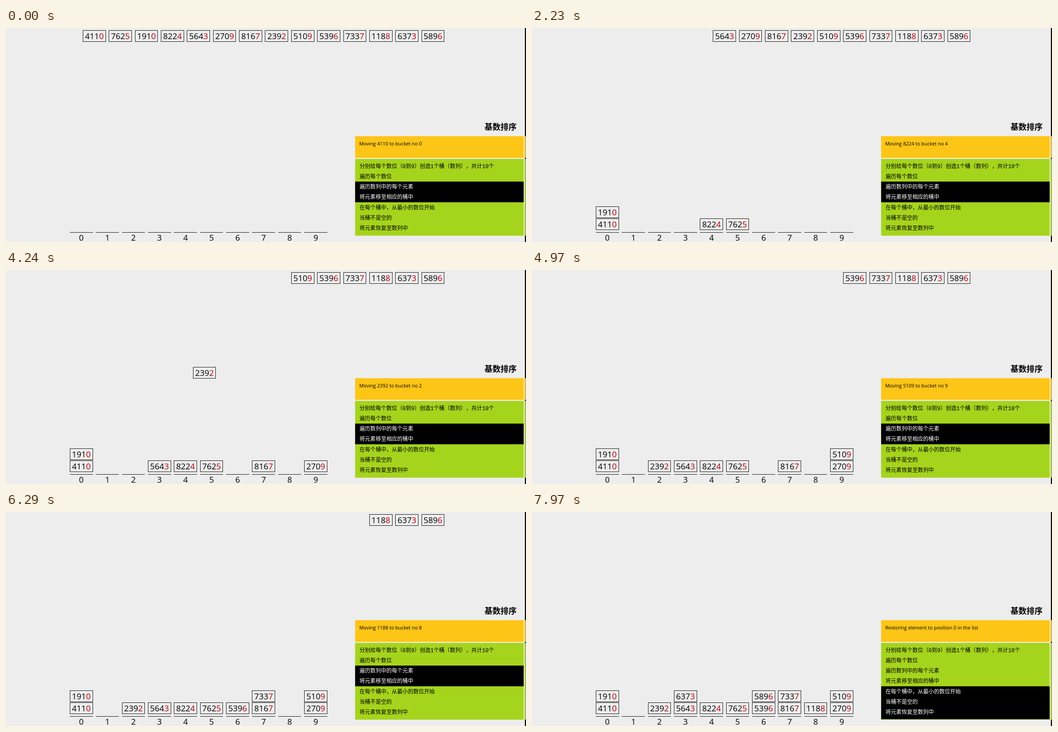
Animation of 1165 by 481 pixels, one loop 7.99 s. Source, as an HTML page:

```html
<!DOCTYPE html>
<html lang="zh-CN">
<head>
<meta charset="utf-8">
<title>基数排序</title>
<style>
  html, body { margin: 0; width: 100%; height: 100%; overflow: hidden; background: #ededed; }
  svg { display: block; }
  .num { font: 18.4px "Open Sans", "Noto Sans", sans-serif; text-anchor: middle; }
  .num tspan { fill: #b4000c; }
  .box { fill: none; stroke: #111; stroke-width: 1; }
  .title { font: bold 18px "Noto Sans CJK SC", "Noto Sans CJK", sans-serif; }
  .msg { font: 10.9px "Open Sans", "Noto Sans", sans-serif; }
  .code {
    font: 300 12.05px "Liberation Mono", "Noto Sans CJK SC", "Noto Sans CJK", monospace;
    text-spacing-trim: space-all;
  }
</style>
</head>
<body>
<svg id="stage" width="1165" height="481" viewBox="0 0 1165 481"></svg>
<script>
const LOOP = 7990, RESTORE = 7970;
const STEP = 58.35, TOP_X = 172.5, BUCKET_X = 143.32, BOX_W = 50.7;
const stage = document.getElementById('stage');

// value, move start, move end
const moves = [
  [4110, 20, 550], [7625, 790, 1170], [1910, 1410, 1710], [8224, 1920, 2230],
  [5643, 2460, 2750], [2709, 2990, 3270], [8167, 3530, 3820], [2392, 4050, 4430],
  [5109, 4660, 4970], [5396, 5200, 5520], [7337, 5740, 6050], [1188, 6290, 6570],
  [6373, 6830, 7220], [5896, 7430, 7730]
];

const lines = [
  '分别给每个数位（0到9）创造1个桶（数列），共计10个',
  '遍历每个数位',
  '遍历数列中的每个元素',
  '将元素移至相应的桶中',
  '在每个桶中，从最小的数位开始',
  '当桶不是空的',
  '将元素恢复至数列中'
];

function add(tag, attrs, text, parent = stage) {
  const el = document.createElementNS('http://www.w3.org/2000/svg', tag);
  set(el, attrs);
  if (text !== undefined) el.textContent = text;
  parent.appendChild(el);
  return el;
}

function set(el, attrs) {
  for (const k in attrs) el.setAttribute(k, attrs[k]);
}

const rect = (x, y, width, height, fill) => add('rect', { x, y, width, height, fill });

// both edges of a box snap to whole pixels
function snap(x) {
  const left = Math.floor(x);
  return { left, width: Math.floor(x + BOX_W) - left };
}

// right edge strip
rect(1162.6, 0, 2.4, 481, '#000');
rect(1162.6, 243.2, 2.4, 48.6, '#fdc516');
rect(1162.6, 294.2, 2.4, 172.6, '#a5d41d');

// panels
add('text', { x: 1072, y: 229, class: 'title' }, '基数排序');
rect(782.2, 243.2, 377.6, 48.6, '#fdc516');
const msg = add('text', { x: 791.5, y: 264, class: 'msg' });
rect(782.2, 294.2, 377.6, 172.6, '#a5d41d');
const mark = rect(782.2, 345.2, 377.6, 46.5, '#000');
const code = lines.map((s, i) =>
  add('text', { x: 792, y: 314.7 + 23.2 * i, class: 'code' }, s));

// buckets
for (let d = 0; d < 10; d++) {
  const x = BUCKET_X + STEP * d;
  const { left, width } = snap(x);
  rect(left, 459, width + 1, 1, '#111');
  add('text', { x: x + 25.5, y: 478, class: 'num' }, d);
}

// numbers, stacked by last digit
const height = Array(10).fill(0);
const items = moves.map(([value, start, end], i) => {
  const digit = value % 10;
  const box = add('rect', { height: 25, class: 'box' });
  const label = add('text', { class: 'num' }, Math.floor(value / 10));
  add('tspan', {}, digit, label);
  return {
    box, label, value, digit, start, end,
    from: [TOP_X + STEP * i, 5],
    to: [BUCKET_X + STEP * digit, 428 - 27 * height[digit]++]
  };
});

const cursor = add('path', {
  d: 'M0 0V11.2L2.5 8.9L4.2 12.8L6 12L4.3 8.2H7.6Z',
  fill: '#fff', stroke: '#000', 'stroke-width': 0.5
});

const progress = (t, a, b) => Math.min(1, Math.max(0, (t - a) / (b - a)));
const swing = p => 0.5 - 0.5 * Math.cos(Math.PI * p);

function place(item, x, y) {
  const { left, width } = snap(x);
  const top = Math.floor(y);
  set(item.box, { x: left + 0.5, y: top + 0.5, width });
  set(item.label, { x: x + 25.5, y: top + 20 });
}

function draw(t) {
  let current = items[0];
  for (const it of items) {
    const p = swing(progress(t, it.start, it.end));
    const [x, y] = it.from.map((v, k) => v + (it.to[k] - v) * p);
    place(it, x, y);
    if (t >= it.start) current = it;
  }

  const restoring = t >= RESTORE;
  msg.textContent = restoring
    ? 'Restoring element to position 0 in the list'
    : `Moving ${current.value} to bucket no ${current.digit}`;
  set(mark, restoring ? { y: 391.7, height: 74.1 } : { y: 345.2, height: 46.5 });
  code.forEach((el, i) => {
    const lit = restoring ? i >= 4 : i === 2 || i === 3;
    set(el, { fill: lit ? '#fff' : '#000' });
  });

  const c = swing(progress(t, 450, 650));
  set(cursor, {
    transform: `translate(${1165 - 20 * c} ${380 - 12 * c})`,
    visibility: t >= 450 && t < 2080 ? 'visible' : 'hidden'
  });
}

const begin = performance.now();
function frame() {
  draw((performance.now() - begin) % LOOP);
  requestAnimationFrame(frame);
}
frame();
</script>
</body>
</html>
```
